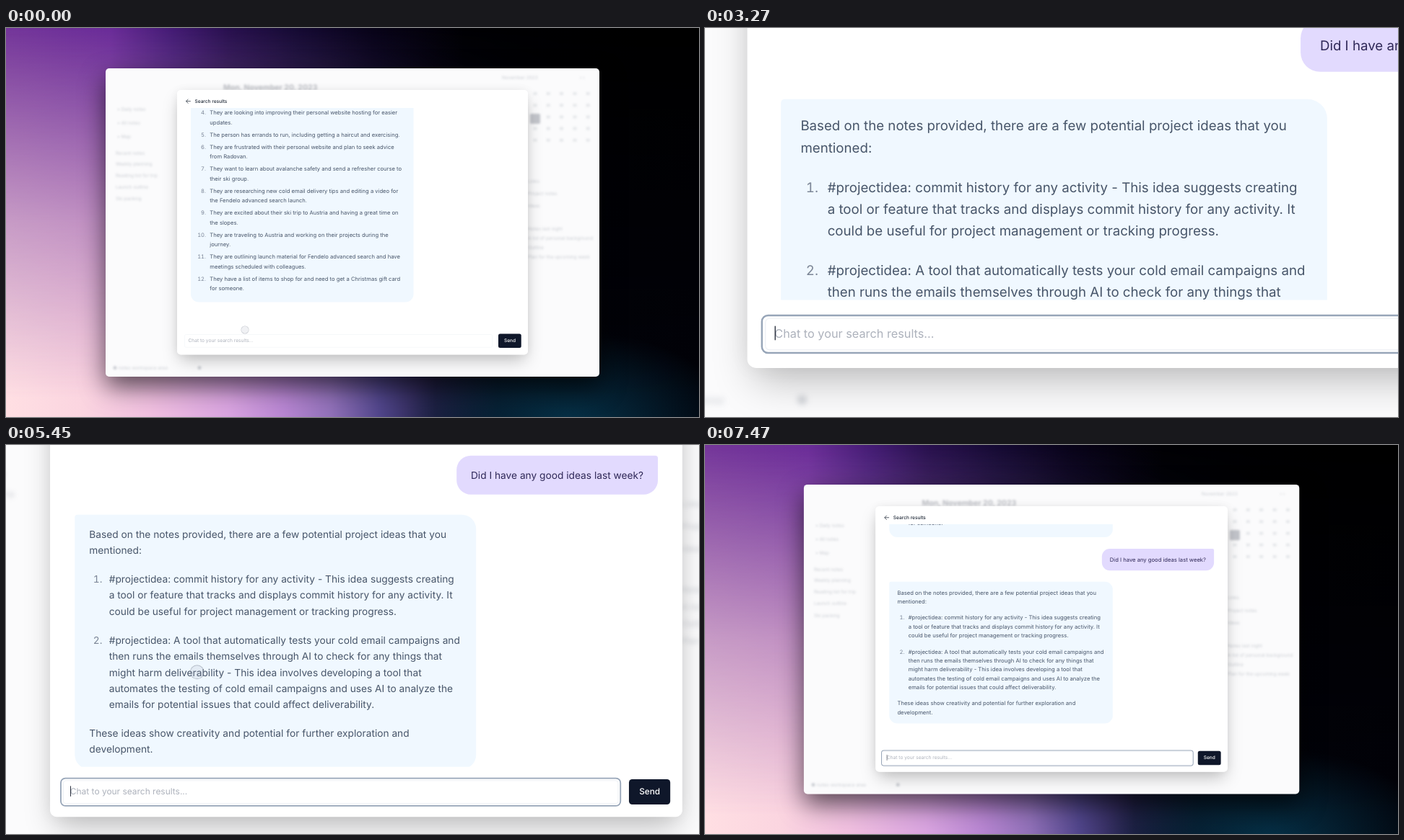
Recreate the animation shown at these times as an HTML page. Size 960 by 540 pixels, loop 7570 ms.

```html
<!DOCTYPE html>
<html lang="en">
<head>
<meta charset="utf-8">
<title>Chat to your search results</title>
<style>
  html, body { margin: 0; width: 100%; height: 100%; overflow: hidden; background: #000; }
  body { position: relative; font: 7.62px/12.37px Inter, sans-serif; font-optical-sizing: none; color: #475569; text-rendering: geometricPrecision; white-space: nowrap; }
  p, ol { margin: 0; padding: 0; list-style: none; }
  #camera, #camera div { position: absolute; box-sizing: border-box; }
  #camera { left: 0; top: 0; transform-origin: 0 0; }
  /* Laid out four times larger so that small offsets are not rounded away */
  #stage { left: 0; top: 0; width: 960px; height: 540px; zoom: 4; }

  .sky, .glow { inset: 0; }
  .sky { background: linear-gradient(90deg, #74369a, #6a2c98 15%, #431b74 24%, #28104e 32%, #150a33 42%, #080318 53%, #010104 66%, #000); }
  .glow {
    background: radial-gradient(ellipse 230px 130px at 780px 550px, #063249, transparent),
      linear-gradient(90deg, #ffdfe3, #fbd5e0 11%, #f0bfe0 21%, #d9a4e0 32%, #b886d2 40%, #9070b8 47%, #50458a 54%, #201c40 62%, #080d1c 71%, #02030a 80%, #010108);
    -webkit-mask: linear-gradient(transparent, #0009 50%, #000 95%);
    mask: linear-gradient(transparent, #0009 50%, #000 95%);
  }

  .window { left: 138px; top: 56px; width: 684px; height: 428px; border-radius: 5px; background: #fbfbfc; box-shadow: 0 14px 34px rgba(0,0,0,.62); }
  #haze { left: 0; top: 0; width: 960px; height: 540px; filter: blur(1.7px); font-size: 6.5px; color: rgba(90,98,115,.3); }
  #haze div { line-height: 10px; }
  #haze .title { font-size: 10.5px; font-weight: 700; color: rgba(70,76,92,.34); }
  #haze .day { width: 5px; height: 4px; background: rgba(90,98,115,.13); }
  #haze .today { left: 726px; top: 119px; width: 14px; height: 14px; border-radius: 2px; background: #c3c5cb; }

  .modal { left: 237px; top: 86px; width: 486px; height: 367.5px; border-radius: 5px; background: #fff; box-shadow: 0 11px 23px -4px rgba(0,0,0,.25), 0 0 12px rgba(0,0,0,.05); }
  .heading { left: 261.5px; top: 95.3px; font-size: 6.55px; font-weight: 500; color: #1f2937; }
  .arrow { position: absolute; left: 248.8px; top: 98px; width: 7.4px; height: 7.4px; fill: none; stroke: #1f2937; stroke-width: .8; }

  .viewport { left: 237px; top: 111px; width: 486px; height: 304px; overflow: hidden; }
  #log { left: -237px; top: -111px; width: 960px; height: 800px; }
  .bubble { left: 256.1px; width: 308.4px; border-radius: 2px 11px 11px 11px; background: #f0f8ff; }
  .notes { top: 60px; height: 320.5px; }
  .notes ol { position: absolute; left: 26.2px; top: 50.95px; line-height: 13.3px; counter-reset: n 3; }
  .notes li { margin-bottom: 3.86px; }
  .question { left: 549.4px; top: 396.4px; width: 154.8px; height: 30.2px; line-height: 30.4px; border-radius: 11px 2px 11px 11px; background: #e2dafe; color: #2f2857; text-align: center; }
  .answer { top: 441.9px; height: 196px; padding: 9.2px 11px; }
  .answer ol { margin: 9.9px 0 9.6px 15.2px; counter-reset: n; }
  .answer li + li { margin-top: 9.9px; }
  li { position: relative; counter-increment: n; }
  li::before { content: counter(n) "."; position: absolute; right: 100%; margin-right: 5.2px; color: #7b8596; font-variant-numeric: tabular-nums; }

  .field { left: 247px; top: 425.2px; width: 427px; height: 18.2px; border: .6px solid #edf0f4; border-radius: 2.5px; }
  #ring { left: 244.7px; top: 423.3px; width: 431.3px; height: 22.3px; border: 1px solid #97a5b8; border-radius: 4px; }
  #hint, #entry { left: 252.4px; top: 427.9px; font-size: 6.63px; white-space: pre; }
  #hint { color: #adb2bc; }
  #entry { color: #1b2230; }
  #caret { display: inline-block; width: .6px; height: 8.2px; margin-right: -.6px; vertical-align: -1.7px; background: #111827; }
  .send { left: 682.1px; top: 424.6px; width: 31.7px; height: 19.4px; border-radius: 2.5px; background: #0f172a; color: #fff; font-size: 6.55px; font-weight: 500; line-height: 19.4px; text-align: center; }
  #camera .cursor { width: 11px; height: 11px; margin: -5.5px; border: .6px solid rgba(120,126,140,.42); border-radius: 50%; background: rgba(150,156,175,.14); }
</style>
</head>
<body>
<div id="camera"><div id="stage">
  <div class="sky"></div>
  <div class="glow"></div>
  <div class="window"></div>
  <div id="haze"></div>
  <div class="modal"></div>
  <svg class="arrow" viewBox="0 0 8 8"><path d="M7.6 4H.8M4 .8.8 4 4 7.2"/></svg>
  <div class="heading">Search results</div>

  <div class="viewport"><div id="log">
    <div class="bubble notes"><ol>
      <li>They are looking into improving their personal website hosting for easier<br>updates.</li>
      <li>The person has errands to run, including getting a haircut and exercising.</li>
      <li>They are frustrated with their personal website and plan to seek advice<br>from Radovan.</li>
      <li>They want to learn about avalanche safety and send a refresher course to<br>their ski group.</li>
      <li>They are researching new cold email delivery tips and editing a video for<br>the Fendelo advanced search launch.</li>
      <li>They are excited about their ski trip to Austria and having a great time on<br>the slopes.</li>
      <li>They are traveling to Austria and working on their projects during the<br>journey.</li>
      <li>They are outlining launch material for Fendelo advanced search and have<br>meetings scheduled with colleagues.</li>
      <li>They have a list of items to shop for and need to get a Christmas gift card<br>for someone.</li>
    </ol></div>
    <div id="reply">
      <div class="question"></div>
      <div class="bubble answer">
        <p>Based on the notes provided, there are a few potential project ideas that you<br>mentioned:</p>
        <ol>
          <li>#projectidea: commit history for any activity - This idea suggests creating<br>a tool or feature that tracks and displays commit history for any activity. It<br>could be useful for project management or tracking progress.</li>
          <li>#projectidea: A tool that automatically tests your cold email campaigns and<br>then runs the emails themselves through AI to check for any things that<br>might harm deliverability - This idea involves developing a tool that<br>automates the testing of cold email campaigns and uses AI to analyze the<br>emails for potential issues that could affect deliverability.</li>
        </ol>
        <p>These ideas show creativity and potential for further exploration and<br>development.</p>
      </div>
    </div>
  </div></div>

  <div class="field"></div>
  <div id="ring"></div>
  <div id="hint">Chat to your search results...</div>
  <div id="entry"><span id="typed"></span><span id="caret"></span></div>
  <div class="send">Send</div>
  <div class="cursor" id="click" style="left:331px;top:419px"></div>
  <div class="cursor" id="hover" style="left:350px;top:342px"></div>
</div></div>

<script>
const $ = id => document.getElementById(id);
const LOOP = 7570, FOCUS = 450, SEND = 3090, ZOOM = 4;
const QUESTION = 'Did I have any good ideas last week?';
const clamp = v => Math.min(1, Math.max(0, v));

// Blurred app behind the dialog: x, centre y, text
const haze = [
  [154, 113, '▪  Daily notes'], [154, 132, '▪  All notes'], [154, 151, '▪  Map'],
  [152, 174, 'Recent notes'], [152, 189, 'Weekly planning'], [152, 205, 'Reading list for trip'],
  [152, 221, 'Launch outline'], [152, 237, 'Ski packing'],
  [148, 472, '●  notes workspace area'], [265, 472, '●'],
  [687, 69, 'November 2023'], [795, 69, '‹ ›'],
  [723, 213, 'Links'], [723, 230, 'Project notes'], [723, 247, 'Ideas'],
  [723, 279, 'Notes last night'], [723, 292, 'A list of personal background'],
  [723, 305, 'Outline'], [723, 318, 'Plan for the upcoming week'],
];

function addHaze(x, y, text = '', name = '') {
  const el = document.createElement('div');
  el.className = name;
  el.textContent = text;
  el.style.left = x + 'px';
  el.style.top = y - (text ? 5 : 2) + 'px';
  $('haze').append(el);
}

haze.forEach(row => addHaze(...row));
addHaze(301, 82, 'Mon, November 20, 2023', 'title');
for (let row = 0; row < 5; row++)
  for (let col = 0; col < 5; col++) addHaze(730.5 + col * 18.3, 91 + row * 16.2, '', 'day');
$('haze').insertAdjacentHTML('beforeend', '<div class="today"></div>');
document.querySelector('.question').textContent = QUESTION;

// Camera as scale, x, y; each move is a critically damped spring
const HOME = [1, 0, 0], NEAR = [2.7055, -583.6, -772.2], MID = [1.802, -366, -301];
const moves = [[40, HOME, NEAR], [3120, NEAR, MID], [6370, MID, HOME]];

function spring(ms) {
  const x = 0.0069 * Math.max(0, ms);
  return 1 - (1 + x) * Math.exp(-x);
}

function cameraAt(t) {
  return HOME.map((v, i) =>
    moves.reduce((sum, [start, from, to]) => sum + (to[i] - from[i]) * spring(t - start), v));
}

// Typing progress: time, characters
const typing = [[1370, 0], [1640, 10], [2000, 25], [2450, 33], [2550, 35], [2815, 35], [2820, 36]];

function typedAt(t) {
  if (t >= SEND || t < typing[0][0]) return 0;
  for (let i = 1; i < typing.length; i++) {
    const [t0, n0] = typing[i - 1], [t1, n1] = typing[i];
    if (t < t1) return Math.floor(n0 + (n1 - n0) * (t - t0) / (t1 - t0));
  }
  return QUESTION.length;
}

function scrollAt(t) {
  if (t < SEND) return 0;
  return 140.6 + 111 * (1 - (1 - clamp((t - 4680) / 1500)) ** 1.8);
}

const show = (id, on) => { $(id).style.visibility = on ? 'visible' : 'hidden'; };

function draw(t) {
  const [s, x, y] = cameraAt(t);
  $('camera').style.transform = `translate(${x}px, ${y}px) scale(${s / ZOOM})`;
  $('log').style.transform = `translateY(${-scrollAt(t)}px)`;

  const count = typedAt(t);
  const blinkOn = (t + 480) % 700 < 350;
  const solid = t >= typing[0][0] && t < SEND;
  $('typed').textContent = QUESTION.slice(0, count);
  show('hint', count === 0);
  show('ring', t >= FOCUS);
  show('caret', t >= FOCUS && (solid || blinkOn));
  show('reply', t >= SEND);

  $('click').style.opacity = clamp((1370 - t) / 150);
  $('hover').style.opacity = clamp((t - 4600) / 150) * clamp((6150 - t) / 200);
}

const start = performance.now();
function tick() {
  draw((performance.now() - start) % LOOP);
  requestAnimationFrame(tick);
}
tick();
</script>
</body>
</html>
```
